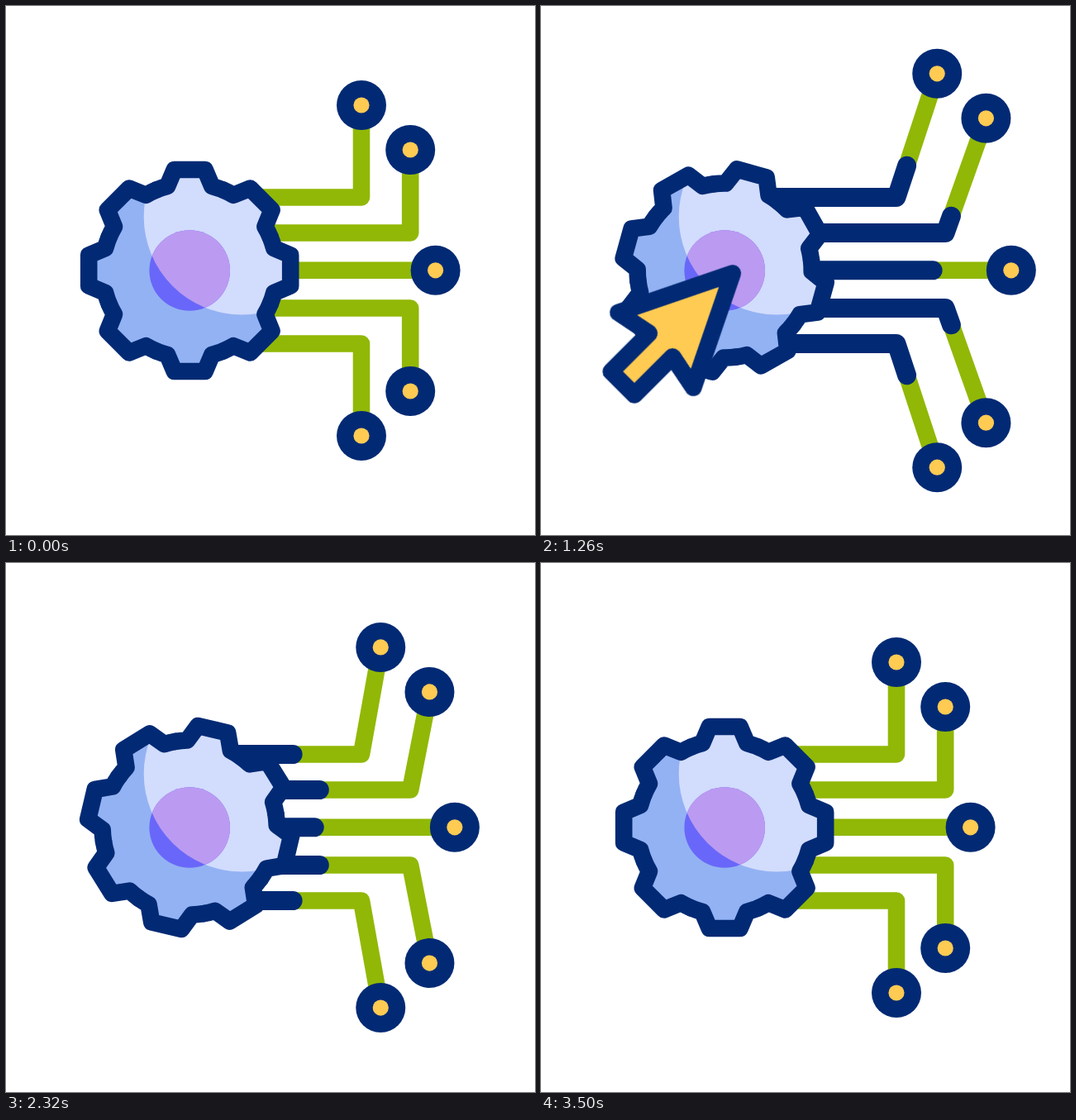
Animation, 640 px wide and 640 px high, one loop 3.6 s. Source, as an HTML page without scripts:

```html
<!DOCTYPE html>
<html lang="en">
<head>
<meta charset="utf-8">
<title>Gear and circuit</title>
<style>
  html, body { margin: 0; height: 100%; overflow: hidden; background: #fff; }
  svg { display: block; width: 100vw; height: 100vh; }
  svg * { animation: 3.6s cubic-bezier(.333, 0, .667, 1) infinite; }

  .outline, .wire, .spark { stroke-linecap: round; stroke-linejoin: round; }
  .outline { stroke: #022a74; stroke-width: 20.6; }

  .wire { fill: none; stroke: #91b806; stroke-width: 20.6; }
  .pulse { stroke: #022a74; stroke-width: 23; stroke-dasharray: 1; }
  .outer { animation-name: bend-outer, flow; }
  .inner { animation-name: bend-inner, flow; }
  .middle { animation-name: stretch, flow; }
  .wire:not(.pulse) { stroke-dasharray: none; }
  .node { --dy: -58.7px; animation-name: spread; }
  .level { --dy: 0px; }

  .press { animation-name: press; }
  .turn { --dir: 1; animation-name: turn; }
  .back { --dir: -1; }

  .spark { fill: none; stroke: #ffcb52; stroke-width: 21; stroke-dasharray: 1 2; animation-name: spark, show; }
  .visit { animation-name: visit; }
  .click { animation-name: click; }

  /* Two swings: out and back, twice; coordinates are relative to the gear axis */
  @keyframes bend-outer {
    0%, 25%, 58.333%, 91.667%, 100% { d: path("M252-88.5H430L430-200"); }
    41.667%, 75% { d: path("M252-88.5H430L505.7-258.7"); }
  }
  @keyframes bend-inner {
    0%, 25%, 58.333%, 91.667%, 100% { d: path("M277-45.5H489.2L489.2-146"); }
    41.667%, 75% { d: path("M277-45.5H489.2L564.9-204.7"); }
  }
  @keyframes stretch {
    0%, 25%, 58.333%, 91.667%, 100% { d: path("M298 0H519.6"); }
    41.667%, 75% { d: path("M298 0H595.3"); }
  }
  @keyframes spread {
    0%, 25%, 58.333%, 91.667%, 100% { translate: 0 0; }
    41.667%, 75% { translate: 75.7px var(--dy); }
  }
  @keyframes flow {
    0%, 25% { stroke-dashoffset: 1; }
    41.667% { stroke-dashoffset: 0; }
    58.333% { stroke-dashoffset: -1; }
    75% { stroke-dashoffset: -2; }
    91.667%, 100% { stroke-dashoffset: -3; }
  }

  @keyframes press {
    0%, 16.667%, 25%, 100% { scale: 1; }
    20.833% { scale: .956; }
  }
  @keyframes turn {
    0%, 25%, 50%, 58.333%, 83.333%, 91.667%, 100% { rotate: 0deg; }
    33.333%, 66.667% { rotate: calc(16deg * var(--dir)); }
    54.167%, 87.5% { rotate: calc(-5.5deg * var(--dir)); }
  }

  @keyframes spark {
    0%, 16.667% { stroke-dashoffset: 1; }
    20.833% { stroke-dashoffset: 0; }
    25%, 100% { stroke-dashoffset: -1; }
  }
  @keyframes show {
    0%, 25%, 100% { opacity: 0; animation-timing-function: step-end; }
    16.7% { opacity: 1; animation-timing-function: step-end; }
  }
  @keyframes visit {
    0%, 58.333%, 100% { translate: -280px 0; }
    16.667%, 41.667% { translate: 0 0; }
  }
  @keyframes click {
    0%, 16.667%, 25%, 100% { translate: 0 0; }
    20.833% { translate: -3.5px 3.5px; }
  }
</style>
</head>
<body>
<svg viewBox="0 0 640 640">
  <defs>
    <!-- One tooth, doubled three times -->
    <path id="tooth" d="M-40.4-97.5A105.5 105.5 0 0 1-27-102L-18.5-122H18.5L27-102A105.5 105.5 0 0 1 40.4-97.5"/>
    <g id="pair"><use href="#tooth"/><use href="#tooth" transform="rotate(45)"/></g>
    <g id="half"><use href="#pair"/><use href="#pair" transform="rotate(90)"/></g>
    <g id="gear"><use href="#half"/><use href="#half" transform="rotate(180)"/></g>
    <mask id="body" fill="#fff"><use href="#gear"/><circle r="104"/></mask>

    <circle id="hub" r="48.8"/>
    <circle id="shine" cx="63" cy="-65" r="118.5"/>
    <clipPath id="in-hub"><use href="#hub"/></clipPath>
    <g id="node">
      <circle r="30" fill="#022a74"/>
      <circle r="9.6" fill="#ffcb52"/>
    </g>
  </defs>

  <g transform="translate(0 320)">
    <path class="wire outer"/>
    <path class="wire inner"/>
    <path class="wire pulse outer" pathLength="1"/>
    <path class="wire pulse inner" pathLength="1"/>
    <g class="node"><use href="#node" x="430" y="-200"/></g>
    <g class="node"><use href="#node" x="489.2" y="-146"/></g>
  </g>
  <g transform="translate(0 320) scale(1 -1)">
    <path class="wire outer"/>
    <path class="wire inner"/>
    <path class="wire pulse outer" pathLength="1"/>
    <path class="wire pulse inner" pathLength="1"/>
    <g class="node"><use href="#node" x="430" y="-200"/></g>
    <g class="node"><use href="#node" x="489.2" y="-146"/></g>
  </g>
  <g transform="translate(0 319.8)">
    <path class="wire middle"/>
    <path class="wire pulse middle" pathLength="1"/>
    <g class="node level"><use href="#node" x="519.6"/></g>
  </g>

  <g transform="translate(222.2 320)">
    <g class="press">
      <g class="turn">
        <g mask="url(#body)">
          <g class="turn back">
            <circle r="140" fill="#93b2f3"/>
            <use href="#shine" fill="#d2dcfd"/>
            <use href="#hub" fill="#6967f9"/>
            <g clip-path="url(#in-hub)"><use href="#shine" fill="#bb9af1"/></g>
          </g>
        </g>
        <use href="#gear" class="outline" fill="none"/>
      </g>
    </g>
  </g>

  <path class="spark" pathLength="1" d="M236.8 278.5v-14"/>
  <path class="spark" pathLength="1" d="M261 298.3l10-10"/>
  <path class="spark" pathLength="1" d="M280.3 324h14"/>

  <g class="visit">
    <g class="click">
      <path class="outline" fill="#ffcb52" transform="translate(231.8 323.4) rotate(45)" d="M0 0L-64.3 131.5-20 122.7V188H20V122.7L64.3 131.5Z"/>
    </g>
  </g>
</svg>
</body>
</html>
```
